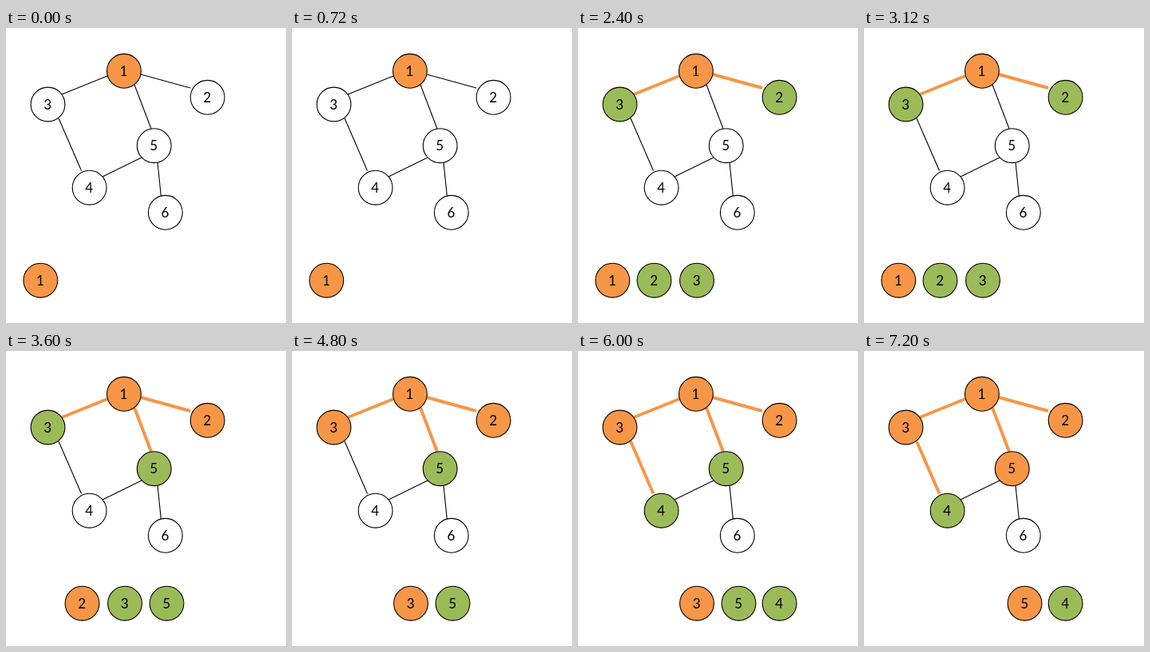
Recreate the animation shown at these times as an HTML page. Size 351x369 px, loop 8000 ms.

```html
<!DOCTYPE html>
<html lang="en">
<head>
<meta charset="utf-8">
<title>Breadth-first search</title>
<style>
  html, body { margin: 0; width: 100%; height: 100%; overflow: hidden; background: #fff; }
  svg { display: block; width: 100vw; height: 100vh; }
  circle { stroke: #000; stroke-width: 1.1; }
  text { font: 17px Lato, sans-serif; text-anchor: middle; fill: #000; }
</style>
</head>
<body>
<svg viewBox="0 0 351 369"></svg>
<script>
const ORANGE = '#f79646', GREEN = '#9bbb59', WHITE = '#fff';
const LOOP = 8000, STEP = 1200, QUEUE_Y = 315.7;
const svg = document.querySelector('svg');

const nodes = {
  1: [147.9, 53.8], 2: [252.6, 86.8], 3: [52.5, 95.5],
  4: [104.6, 199.7], 5: [185.7, 147.2], 6: [199.8, 230.8]
};
const edges = {
  12: [169, 58, 231, 75], 13: [127, 60, 70, 83], 15: [161, 71, 182, 126],
  34: [66, 113, 94.5, 178.5], 45: [121, 186, 170, 162], 56: [190, 168, 194.3, 210]
};
const slots = [43.3, 95.5, 149, 201.5, 252.6];

// done: orange nodes, seen: green nodes, used: orange edges, queue: [label, x]
const steps = [
  { done: '1', seen: '', used: [], queue: [[1, slots[0]]] },
  { done: '1', seen: '2', used: ['12'], queue: [[1, slots[0]], [2, 104]] },
  { done: '1', seen: '23', used: ['12', '13'], queue: [[1, slots[0]], [2, slots[1]], [3, slots[2]]] },
  { done: '12', seen: '35', used: ['12', '13', '15'], queue: [[2, slots[1]], [3, slots[2]], [5, slots[3]]] },
  { done: '123', seen: '5', used: ['12', '13', '15'], queue: [[3, slots[2]], [5, slots[3]]] },
  { done: '123', seen: '54', used: ['12', '13', '15', '34'], queue: [[3, slots[2]], [5, slots[3]], [4, slots[4]]] },
  { done: '1235', seen: '4', used: ['12', '13', '15', '34'], queue: [[5, slots[3]], [4, slots[4]]] }
];

function line([x1, y1, x2, y2], used) {
  return `<line x1="${x1}" y1="${y1}" x2="${x2}" y2="${y2}" ` +
    `stroke="${used ? ORANGE : '#000'}" stroke-width="${used ? 4 : 1.1}"/>`;
}

function disc(label, x, y, fill) {
  return `<circle cx="${x}" cy="${y}" r="21.4" fill="${fill}"/>` +
    `<text x="${x - 0.4}" y="${y + 6}">${label}</text>`;
}

function draw({ done, seen, used, queue }) {
  const color = n => done.includes(n) ? ORANGE : seen.includes(n) ? GREEN : WHITE;
  svg.innerHTML =
    Object.entries(edges).map(([id, e]) => line(e, used.includes(id))).join('') +
    Object.entries(nodes).map(([n, [x, y]]) => disc(n, x, y, color(n))).join('') +
    queue.map(([n, x]) => disc(n, x, QUEUE_Y, color(n))).join('');
}

let shown = -1;
const start = performance.now();

function tick() {
  const i = Math.floor((performance.now() - start) % LOOP / STEP);
  if (i !== shown) draw(steps[shown = i]);
  requestAnimationFrame(tick);
}
tick();
</script>
</body>
</html>
```
